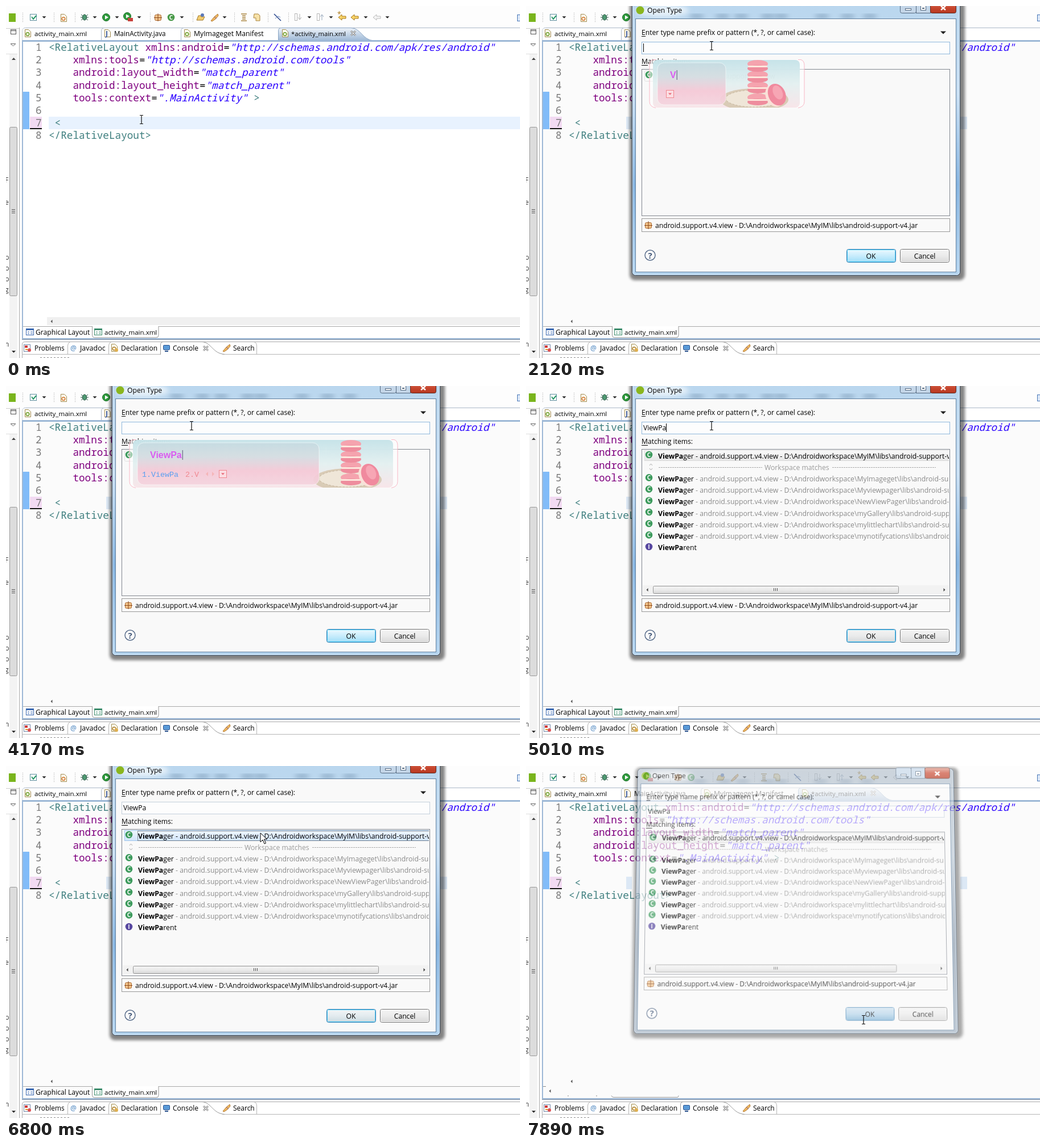
Animation of 903 by 620 pixels, one loop 8 s. Source, as an HTML page:

```html
<!DOCTYPE html>
<html lang="en">
<head>
<meta charset="utf-8">
<title>Open Type dialog</title>
<style>
html, body { margin: 0; width: 100%; height: 100%; overflow: hidden; background: #fff; }
svg { position: absolute; left: 0; top: 0; width: 903px; height: 620px; overflow: visible; }
text { font-family: "Open Sans", sans-serif; font-size: 12.15px; white-space: pre; }
.code { font-family: "Noto Sans Mono", monospace; font-size: 17.66px; }
.ime { font-family: "Liberation Mono", monospace; font-size: 13.33px; }
.typed { font: bold 16px "Liberation Sans", sans-serif; }
.row { font-size: 12.25px; }
#dialog { transform-origin: 452px 245px; }
</style>
</head>
<body>
<svg id="editor"></svg>
<svg id="dialog"></svg>
<svg id="pointer"></svg>
<script>
const LOOP = 8000;
const $ = id => document.getElementById(id);
const text = (x, y, s, attrs = '') => `<text x="${x}" y="${y}" ${attrs}>${s.replace(/</g, '&lt;')}</text>`;
const span = (s, attrs) => `<tspan ${attrs}>${s.replace(/</g, '&lt;')}</tspan>`;
const rect = (x, y, w, h, fill, attrs = '') => `<rect x="${x}" y="${y}" width="${w}" height="${h}" fill="${fill}" ${attrs}/>`;
const box = (x, y, w, h, fill, stroke, attrs = '') => rect(x + .5, y + .5, w - 1, h - 1, fill, `stroke="${stroke}" ${attrs}`);
const path = (d, stroke, fill = 'none', attrs = '') => `<path d="${d}" stroke="${stroke}" fill="${fill}" ${attrs}/>`;
const disc = (x, y, r, fill, attrs = '') => `<circle cx="${x}" cy="${y}" r="${r}" fill="${fill}" ${attrs}/>`;
const oval = (x, y, rx, ry, fill, attrs = '') => `<ellipse cx="${x}" cy="${y}" rx="${rx}" ry="${ry}" fill="${fill}" ${attrs}/>`;
const down = (x, y, s = 3.5, fill = '#222') => path(`M${x - s} ${y - s / 2}h${2 * s}l${-s} ${s}z`, 'none', fill);
const side = (x, y, s, fill = '#444') => path(`M${x + s / 2} ${y - Math.abs(s)}v${2 * Math.abs(s)}l${-s} ${-Math.abs(s)}z`, 'none', fill);
const grad = (id, ...stops) => `<linearGradient id="${id}" x2="0" y2="1">${stops.map((c, i) =>
  `<stop offset="${i / (stops.length - 1)}" stop-color="${c}"/>`).join('')}</linearGradient>`;
const badge = (x, y, letter, fill) => disc(x, y, 6.3, fill) +
  text(x, y + 3.6, letter, 'fill="#fff" text-anchor="middle" style="font-size:10px;font-weight:bold"');

// Small generic icons
const page = (x, y, dot = '#6a9a28') => path(`M${x - 4.5} ${y - 6.5}h6l4 4v9h-10z`, '#a08a50', '#fffdf0') +
  disc(x, y + 1.5, 2.8, 'none', `stroke="${dot}" stroke-width="1.5"`);
const play = (x, y) => disc(x, y, 6.5, '#2f9a3c', 'stroke="#1c6e2a"') + path(`M${x - 2} ${y - 3.5}l6 3.5l-6 3.5z`, 'none', '#fff');
const crate = (x, y) => box(x - 6, y - 5, 12, 11, '#f2c48c', '#a8642c', 'rx="2"') + path(`M${x} ${y - 7}v14M${x - 7} ${y + .5}h14`, '#8c4a1c');
const torch = (x, y) => path(`M${x - 6} ${y + 6}l6 -7l6 -5l1 3l-5 6l-6 4z`, '#b07830', '#f0b860') + path(`M${x} ${y - 1}l4 3`, '#8060a0');
const arrow = (x, y, c, edge) => path(`M${x - 7} ${y}l6 -5v3h7v4h-7v3z`, edge, c);
const bug = (x, y) => path(`M${x - 6} ${y - 5}l12 10M${x + 6} ${y - 5}l-12 10M${x - 7} ${y}h14`, '#2b5b4b') + oval(x, y, 3.5, 5, '#4f9a72', 'stroke="#23503e"');
const cross = (x, y) => path(`M${x - 4} ${y - 4}l8 8m0 -8l-8 8`, '#8a8a8a', 'none', 'stroke-width="3"') +
  path(`M${x - 4} ${y - 4}l8 8m0 -8l-8 8`, '#fff');
const layout = (x, y, c) => box(x - 7, y - 6, 14, 12, '#fff', c) + rect(x - 7, y - 6, 14, 3, c) + path(`M${x - 4} ${y}h3m2 0h4M${x - 4} ${y + 3}h3m2 0h4`, c);

function toolbar() {
  const dots = [29, 84, 121, 253, 328, 401, 460, 496].map(x => path(`M${x}.5 12v17`, '#999', 'none', 'stroke-dasharray="1 2"')).join('');
  const menus = [67, 156, 195, 234, 309, 384, 533, 571, 632, 670].map(x => down(x, 20)).join('');
  return rect(0, 0, 903, 38, '#fdfdfd') + dots + menus + rect(5, 13, 12, 15, '#7ab51d') +
    box(42, 14, 12, 12, '#fff', '#5e8f9d') + path('M45 19l3 4l5 -6', '#2a9a6a', 'none', 'stroke-width="2"') +
    page(101, 21, '#d27832') + bug(138, 20) + play(176, 20) + play(213, 18) + rect(214, 21, 9, 6, '#c8423c') +
    crate(267, 20) + badge(290, 20, 'C', '#4a9a4a') +
    path('M335 25l3 -8h4l1 2h6l-3 6z', '#a07828', '#f2cc70') + disc(345, 16, 3, '#5b78b8') + torch(366, 20) +
    path('M413 14h10m-10 12h10M415 17h6m-6 3h6m-6 3h6', '#a8823c', 'none', 'stroke-width="1.5"') +
    path('M436 14h7l3 3v9h-7v-5h-4z', '#a8823c', '#f7e2a8') +
    path('M471 14l12 12', '#28468c', 'none', 'stroke-width="1.5"') + path('M473 22l5 -4l4 2', '#6a86b8') +
    box(507, 13, 5, 13, '#fff', '#b5b5b5') + path('M516 14v9m-3 -3l3 4l3 -4', '#b0b0b0') +
    box(546, 13, 5, 13, '#fff', '#b5b5b5') + path('M555 25v-9m-3 3l3 -4l3 4', '#9aaabd') +
    arrow(591, 20, '#f8d468', '#a87818') + text(582, 19, '*', 'fill="#a87818"') + arrow(613, 20, '#f8d468', '#a87818') +
    arrow(652, 20, '#f4f4f4', '#bbb') + box(898, 15, 8, 12, '#dce8f8', '#4a78b8');
}

function sidebar() {
  const scraps = [['F', 311], ['e', 350], ['p', 447], ['p', 466], ['p', 485], ['g', 504], ['m', 600]];
  return path('M23.5 38V620', '#a8a8a8') + path('M0 39.5h23', '#ccc') + path('M0 84.5h20', '#ddd') +
    box(8, 41, 10, 9, '#fff', '#555') + path('M8 43.5h10', '#555') + path('M8 66.500h9l-4.500 4z', '#666', '#fff') +
    rect(6, 85, 14, 535, '#f3f3f3') + path('M10 95h7l-3.500 -4z', 'none', '#444') + down(13.5, 609) +
    box(6, 213, 14, 298, '#dcdcdc', '#979797', 'rx="2"') + path('M10 358.500h6m-6 3h6m-6 3h6', '#555') +
    scraps.map(([s, y]) => text(s === 'm' ? -6 : -2, y, s, 'fill="#333"')).join('');
}

function tabs() {
  const file = (x, s, size, y = 53) => text(x, y, s, `style="font-size:${size}px"`);
  return path('M28.500 60V44q0 -5.500 6 -5.500H903', '#a9b7c8') + rect(28, 39, 875, 21, '#fdfdfd', 'opacity=".3"') +
    path('M478.500 61V44q0 -5.500 5 -5.500H606C624 39 626 60 646 61z', '#8aa5c4', 'url(#tab)') +
    path('M167.500 61V44q0 -5 5 -5.500M307.500 61V44q0 -5 5 -5.500', '#a9b7c8') +
    page(38, 48) + file(50, 'activity_main.xml', 11.5) +
    page(178, 48, '#fff') + text(175, 53, 'J', 'fill="#3c5a9c" font-weight="bold"') + file(190, 'MainActivity.java', 11.7) +
    page(318, 48) + file(330, 'MyImageget Manifest', 12.2) + page(490, 48) + file(501, '*activity_main.xml', 11.2) + cross(610, 48) +
    rect(28, 60, 875, 3, '#9db8d6') + rect(28, 60, 2, 527, '#9db8d6') + rect(28, 585, 875, 2, '#9db8d6') + path('M28 587.500H903', '#7f8fa3');
}

function views() {
  return path('M28.500 620V596q0 -4.500 5 -4.500H903', '#a9a9a9') + path('M28 613.500H271M380 613.500H903', '#b5b5b5') +
    path('M108.500 613V598q0 -5 4 -6M180.500 613V598q0 -5 4 -6M440.500 613V598q0 -5 -4 -6', '#b5b5b5') +
    path('M271.500 614V597q0 -5.500 5 -5.500H345C361 593 363 612 384 613.500', '#999') +
    box(31, 596, 12, 13, '#fff', '#7088a8') + rect(33, 598, 5, 4, '#d03838') + disc(41, 606, 3, '#e05050') + path('M34 605h4', '#e0a030', 'none', 'stroke-width="2"') +
    text(113, 607, '@', 'fill="#3878b8"') + page(190, 602, '#b08030') + disc(194, 606, 3, '#e0b050') +
    box(276, 597, 12, 9, '#5a9ad8', '#28508c', 'rx="1"') + rect(279, 607, 6, 2, '#28508c') + cross(351, 603) + torch(387, 602) +
    [[50, 'Problems', 11.9], [130, 'Javadoc', 12.5], [202, 'Declaration', 12], [293, 'Console', 12], [399, 'Search', 12]]
      .map(([x, s, size]) => text(x, 607, s, `style="font-size:${size}px"`)).join('') +
    path('M60 619.500h52', '#888', 'none', 'stroke-dasharray="3 3"');
}

function source() {
  const tag = s => span(s, 'fill="#3f7f7f"');
  const attr = (name, value) => span(name, 'fill="#7f007f"') + span('=', 'fill="#000"') + span(`"${value}"`, 'fill="#2a00ff" font-style="italic"');
  const host = 'http://schemas.android.com/';
  const lines = [
    tag('<RelativeLayout ') + attr('xmlns:android', host + 'apk/res/android'),
    '    ' + attr('xmlns:tools', host + 'tools'),
    '    ' + attr('android:layout_width', 'match_parent'),
    '    ' + attr('android:layout_height', 'match_parent'),
    '    ' + attr('tools:context', '.MainActivity') + tag(' >'),
    '', tag(' <'), tag('</RelativeLayout>')];
  return lines.map((line, i) => {
    const y = 79 + 22.17 * i;
    return text(52, y, `${i + 1}`, 'class="code" fill="#787878"') + `<text class="code" x="75" y="${y}">${line}</text>`;
  }).join('');
}

$('editor').innerHTML = `<defs>${grad('tab', '#eef3f9', '#9db8d6')}
  <pattern id="hatch" width="2" height="2" patternUnits="userSpaceOnUse">${rect(0, 0, 2, 2, '#b9dcff')}${rect(0, 0, 1, 1, '#4a9cf2')}${rect(1, 1, 1, 1, '#4a9cf2')}</pattern></defs>` +
  rect(0, 0, 903, 620, '#fff') + toolbar() + sidebar() + rect(30, 63, 873, 522, '#fff', 'id="paper"') + tabs() + views() +
  `<g id="active">${rect(75, 195, 828, 22, '#e8f2fe')}${rect(72, 548, 831, 14, '#f0f0f0')}</g>` +
  `<g id="inactive">${rect(176, 195, 10, 22, '#dce8f5')}${rect(763, 195, 12, 22, '#dce8f5')}</g>` +
  rect(30, 151, 11, 66, 'url(#hatch)') + rect(42, 195, 21, 20, '#f2daf2') + rect(42, 215, 21, 2, '#111') +
  source() + side(80, 555.5, 3, '#555') +
  `<g id="sheets">${path('M30 564.500H903', '#a9a9a9') + path('M151.500 564V580q0 4 4 4H264q4 0 4 -4V564', '#999', '#fff') +
    layout(42, 574, '#3a68b0') + text(52, 579, 'Graphical Layout') + layout(162, 574, '#3c8c6c') + text(173, 579, 'activity_main.xml', 'style="font-size:11.5px"')}</g>` +
  `<g id="bare">${side(42, 572.5, 3, '#555') + path('M150 580.500q1 3 4 3H266q2 0 2 -3', '#999') + path('M30 564.500h5M73 581h2m48 0h2', '#888')}</g>`;

function resultRow(i, project) {
  const y = 127.5 + 20.2 * i, first = !i;
  return badge(216, y - 6.5, 'C', '#3c9a5c') + `<text class="row" x="232" y="${y}">${span('ViewPa', 'font-weight="bold"')}${span('ger', '')}${
    span(` - android.support.v4.view - D:\\Androidworkspace\\${project}\\libs\\android-support-v4.jar`, `fill="${first ? '#000' : '#8a8a8a'}"`)}</text>`;
}

const projects = ['MyIM', '', 'MyImageget', 'Myviewpager', 'NewViewPager', 'myGallery', 'mylittlechart', 'mynotifycations'];
const results = projects.map((p, i) => p && resultRow(i, p)).join('') +
  path('M217 140l2.500 -3l2.500 3M217 145l2.500 3l2.500 -3', '#aaa') +
  path('M233 143.500H415M538 143.500H720', '#aaa', 'none', 'stroke-dasharray="3 1"') + text(419, 147.7, 'Workspace matches', 'fill="#999"') +
  badge(216, 283, 'I', '#5848a0') + `<text class="row" x="232" y="289">${span('ViewPa', 'font-weight="bold"')}rent</text>` +
  rect(205, 351, 538, 16, '#f2f2f2') + side(213, 359, 3) + side(735, 359, -3) +
  box(223, 352, 432, 14, 'url(#button)', '#979797', 'rx="2"') + path('M435.500 356v5m3 -5v5m3 -5v5', '#555');

const macaron = y => oval(-82, y - 4, 18, 7, '#f5a3ae') + oval(-82, y + 4, 18, 6, '#ee8d9d') + rect(-99, y - 1, 34, 3, '#fde6dc', 'rx="1.500"');
const photo = oval(-88, 165, 60, 20, '#d9cbb6') + oval(-88, 163, 50, 15, '#efe6d8', 'stroke="#c5b59d" stroke-dasharray="3 3"') +
  [165, 144, 125, 106].map(macaron).join('') +
  `<g transform="rotate(-25 -50 157)">${oval(-53, 157, 15, 20, '#fbe0d8') + oval(-48, 157, 15, 20, '#f08a9e') + oval(-45, 154, 8, 13, '#f7a6b4')}</g>`;
const spark = (x, y, s) => path(`M${x - s} ${y}h${2 * s}M${x} ${y - s}v${2 * s}`, '#fff', 'none', 'stroke-width="1.5"');

$('dialog').innerHTML = `<defs>${grad('glass', '#b9d6ee', '#c9dff3', '#85b3df', '#b7d6f0')}${grad('dimGlass', '#b4c0cc', '#b8c6d4', '#8c9cae', '#a4b4c4')}
  ${grad('button', '#f4f4f4', '#ebebeb', '#d8d8d8')}${grad('glow', '#e8f8ff', '#c8ecfc', '#a4e0f8')}${grad('pressed', '#cfe2f0', '#b4d3ea', '#7fb2d6')}
  ${grad('red', '#e0a090', '#c84830', '#b83820')}${grad('gray', '#fafafa', '#e6e6e6')}${grad('blue', '#eef6ff', '#d2e5fb')}
  ${grad('skin', '#c4e2e8', '#e3f0f0', '#f8e4e8')}${grad('mist', '#c6dce2', '#d6dde2', '#f6c9d7', '#f5d4de')}
  <filter id="blur"><feGaussianBlur stdDeviation="4"/></filter><filter id="shade"><feGaussianBlur stdDeviation="2.5"/></filter>
  <clipPath id="list"><rect x="205" y="112" width="538" height="256"/></clipPath>
  <clipPath id="skinClip"><rect id="skinArea" x="223" y="95" height="84" rx="8"/></clipPath></defs>` +
  rect(182, -8, 589, 491, '#000', 'rx="9" opacity=".48" filter="url(#shade)"') +
  box(186, -6, 577, 481, 'url(#glass)', '#34465a', 'id="border" rx="6"') + rect(187.5, -4.5, 574, 478, 'none', 'rx="5" stroke="#e4f1fc" stroke-opacity=".8"') +
  `<g filter="url(#blur)" opacity=".4">${[300, 345, 378, 425, 448, 520, 565, 604].map(x => oval(x, 18, 13, 4, '#4c6c8c')).join('')}</g>` +
  oval(240, 8, 46, 11, '#fff', 'filter="url(#blur)" opacity=".65"') +
  disc(200.5, 7.5, 7, '#8ab61f') + text(213, 12, 'Open Type') +
  box(657, -8, 29, 21, '#c4d6e8', '#566b82', 'rx="3"') + box(685, -8, 26, 21, '#c4d6e8', '#566b82') + box(710, -8, 46, 21, 'url(#red)', '#5c2a22', 'rx="3"') +
  box(666, 4, 11, 4, '#fff', '#566b82') + box(693, -1, 10, 9, '#fff', '#566b82') + rect(696, 3, 4, 2, '#566b82') +
  path('M729 0l8 7m0 -7l-8 7', '#fff', 'none', 'stroke-width="2.500"') +
  box(192, 22, 564, 447, '#f9f9f9', '#5f7f9f') +
  text(203, 51, 'Enter type name prefix or pattern (*, ?, or camel case):') + path('M203 53.500h7M203 104.500h11', '#000') + down(733, 47, 5) +
  text(203, 102, 'Matching items:') + box(203, 63, 542, 22, '#fdfdfd', '#8fb8dc', 'id="field"') +
  text(206, 78, 'ViewPa', 'id="entry"') + rect(206, 66, 1, 15, '#000', 'id="caret"') +
  box(203, 111, 542, 259, '#f9f9f9', '#828790') +
  `<g id="initial">${box(208, 113, 235, 20, '#fafafa', '#e0e0e0', 'rx="2"') + badge(216, 121, 'C', '#3c9a5c') + text(232, 127.5, 'ViewPager - android.support.v4.view')}</g>` +
  `<g id="results" clip-path="url(#list)">${box(208, 113, 540, 19, 'url(#gray)', '#dadada', 'id="row"') + results + box(231, 114, 513, 18, 'none', '#333', 'id="focus" stroke-dasharray="1 1"')}</g>` +
  box(203, 374, 542, 24, '#f9f9f9', '#999') + crate(215, 386) +
  text(227, 390.7, 'android.support.v4.view - D:\\Androidworkspace\\MyIM\\libs\\android-support-v4.jar') +
  disc(218, 439, 9, '#fcfcfc', 'stroke="#5b6f8c" stroke-width="1.5"') + text(218, 444.5, '?', 'text-anchor="middle" fill="#44597a" style="font-size:15px;font-weight:bold"') +
  box(657, 428, 87, 24, 'url(#button)', '#707070', 'rx="3"') + rect(658.5, 429.5, 84, 21, 'none', 'rx="2" stroke="#fafafa"') + text(700.5, 445, 'Cancel', 'text-anchor="middle"') +
  box(563, 428, 87, 24, 'url(#button)', '#3c7fb1', 'rx="3"') + rect(564.5, 429.5, 84, 21, 'none', 'rx="2" stroke="#48c8f4"') +
  rect(565, 430, 83, 20, 'url(#glow)', 'id="pulse" rx="2"') + rect(564, 429, 85, 22, 'url(#pressed)', 'id="press" rx="2"') + text(606, 445, 'OK', 'text-anchor="middle"') +
  `<g id="ime"><g id="frame"></g><g clip-path="url(#skinClip)">${rect(216, 94, 500, 86, 'url(#skin)', 'opacity=".96"')}<g id="photo">${photo}
    <g id="sparks">${spark(-126, 115, 7) + spark(-82, 125, 5) + spark(-98, 104, 4) + spark(-32, 143, 7) + spark(-133, 162, 5)}</g></g></g>
  ${rect(231, 100, 100, 74, 'url(#mist)', 'id="panel" rx="11" stroke="#fff" stroke-opacity=".6" opacity=".92"')}
  ${text(253, 127, '', 'id="typed" class="typed" fill="#db5cf0"') + rect(264, 113, 1, 17, '#557', 'id="imeCaret"')}
  ${text(239, 160, '', 'id="first" class="ime" fill="#5a9ff0"') + text(0, 160, '2.V', 'id="second" class="ime" fill="#f08890"')}
  <g id="pager">${side(-21, 155, 4, '#f5b5b8') + side(-10, 155, -4, '#f5b5b8')}</g>
  <g id="more">${box(0, 148, 14, 14, '#fbdde2', '#f08890') + down(7, 155, 3, '#e86070')}</g></g>`;

$('pointer').innerHTML = `<g id="arrow">${path('M0 0v16l4 -4l3 7l2.500 -1l-3 -7h5z', '#000', '#fff')}</g>
  <g id="beam">${path('M-3 -7.500h2.500l.5 .5l.5 -.5h2.500M0 -7v14M-3 7.500h2.500l.5 -.5l.5 .5h2.500', '#111', 'none', 'stroke-width="1.2"')}</g>`;

const steps = [[2000, 'V', 489], [2380, 'Vi', 655], [2640, 'Vie', 663], [2900, 'View', 671], [3600, 'ViewP', 680], [4170, 'ViewPa', 688]];
const moves = [[0, 238, 200], [150, 236.5, 199], [1200, 236.5, 199], [1850, 326, 70], [5990, 326, 70], [6420, 447, 118], [6940, 447, 118], [7580, 593, 447], [LOOP, 593, 447]];
const COMMIT = 4560, LIST = 4690, PICK = 6550, CLOSE = 7890;
const show = (id, on) => $(id).style.display = on ? '' : 'none';
const set = (id, attrs) => Object.entries(attrs).forEach(([k, v]) => $(id).setAttribute(k, v));
const at = (x, y = 0) => ({ transform: `translate(${x} ${y})` });

function drawPointer(t) {
  const i = moves.findIndex(m => m[0] > t);
  const [t0, x0, y0] = moves[i - 1], [t1, x1, y1] = moves[i];
  const p = (t - t0) / (t1 - t0), e = p * p * (3 - 2 * p);
  const x = x0 + (x1 - x0) * e, y = y0 + (y1 - y0) * e;
  const beam = t < 150 || t >= CLOSE || (y > 62 && y < 86);
  show('beam', beam);
  show('arrow', !beam);
  set(beam ? 'beam' : 'arrow', at(x, y));
}

function drawIme(t) {
  const open = t >= 2000 && t < COMMIT;
  show('ime', open);
  if (!open) return;
  const [, word, right] = steps.filter(s => s[0] <= t).pop();
  const listed = word.length > 1, end = 239 + 8 * (word.length + 2);
  set('skinArea', { width: right - 231 });
  set('panel', { width: right - 369 });
  set('photo', at(right));
  set('sparks', { opacity: (1 - Math.cos((t - 2120) * Math.PI / 950)) / 2 });
  $('frame').innerHTML = rect(216.5, 94.5, right - 217, 85, '#fff', 'rx="9" opacity=".5"') +
    path(`M228 94.500h-5q-6 2 -6 10v64q0 9 11 11M${right - 11} 94.500h5q6 2 6 10v64q0 9 -11 11`, '#f9b8c6');
  $('typed').textContent = word;
  set('imeCaret', { x: 254 + $('typed').getComputedTextLength() });
  $('first').textContent = '1.' + word;
  set('second', { x: end + 12 });
  ['first', 'second', 'pager'].forEach(id => show(id, listed));
  const moreX = listed ? end + 71 : 246;
  set('more', at(moreX));
  set('pager', at(moreX));
}

function drawDialog(t) {
  const open = t >= 150, closing = t >= CLOSE;
  const fade = closing ? .68 : t < 290 ? .45 : t < 420 ? .8 : 1;
  const tilt = closing ? 1 : t < 290 ? 1.6 : t < 420 ? .6 : 0;
  show('dialog', open);
  $('dialog').style.opacity = fade;
  $('dialog').style.transform = tilt ? `perspective(1500px) rotateX(${5 * tilt}deg) scale(${1 - .024 * tilt})` : 'none';
  set('border', { fill: closing ? 'url(#dimGlass)' : 'url(#glass)' });
  show('active', !open);
  show('inactive', open);
  set('paper', { fill: open ? '#fbfbfb' : '#fff' });
  show('sheets', !closing);
  show('bare', closing);

  const committed = t >= COMMIT, listed = t >= LIST, picked = t >= PICK;
  const focused = picked && t < 7750;
  show('entry', committed);
  show('initial', !listed);
  show('results', listed);
  show('focus', focused);
  set('row', { fill: focused ? 'url(#blue)' : 'url(#gray)', stroke: focused ? '#9cc4ec' : '#dadada' });
  set('field', { stroke: picked ? '#c3cfdb' : '#8fb8dc' });
  const blinkStart = t < 2000 ? 400 : t < COMMIT ? 2120 : 4600;
  show('caret', !picked && Math.floor(Math.max(0, t - blinkStart) / 530) % 2 === 0);
  set('caret', { x: committed ? 246 : 206 });
  set('pulse', { opacity: .5 + .5 * Math.cos((t - 2120) * Math.PI / 1000) });
  set('press', { opacity: t < 7500 ? 0 : t < 7750 ? .5 : 1 });
}

const start = performance.now();
function draw() {
  const t = (performance.now() - start) % LOOP;
  drawDialog(t);
  drawIme(t);
  drawPointer(t);
  requestAnimationFrame(draw);
}
draw();
</script>
</body>
</html>
```
